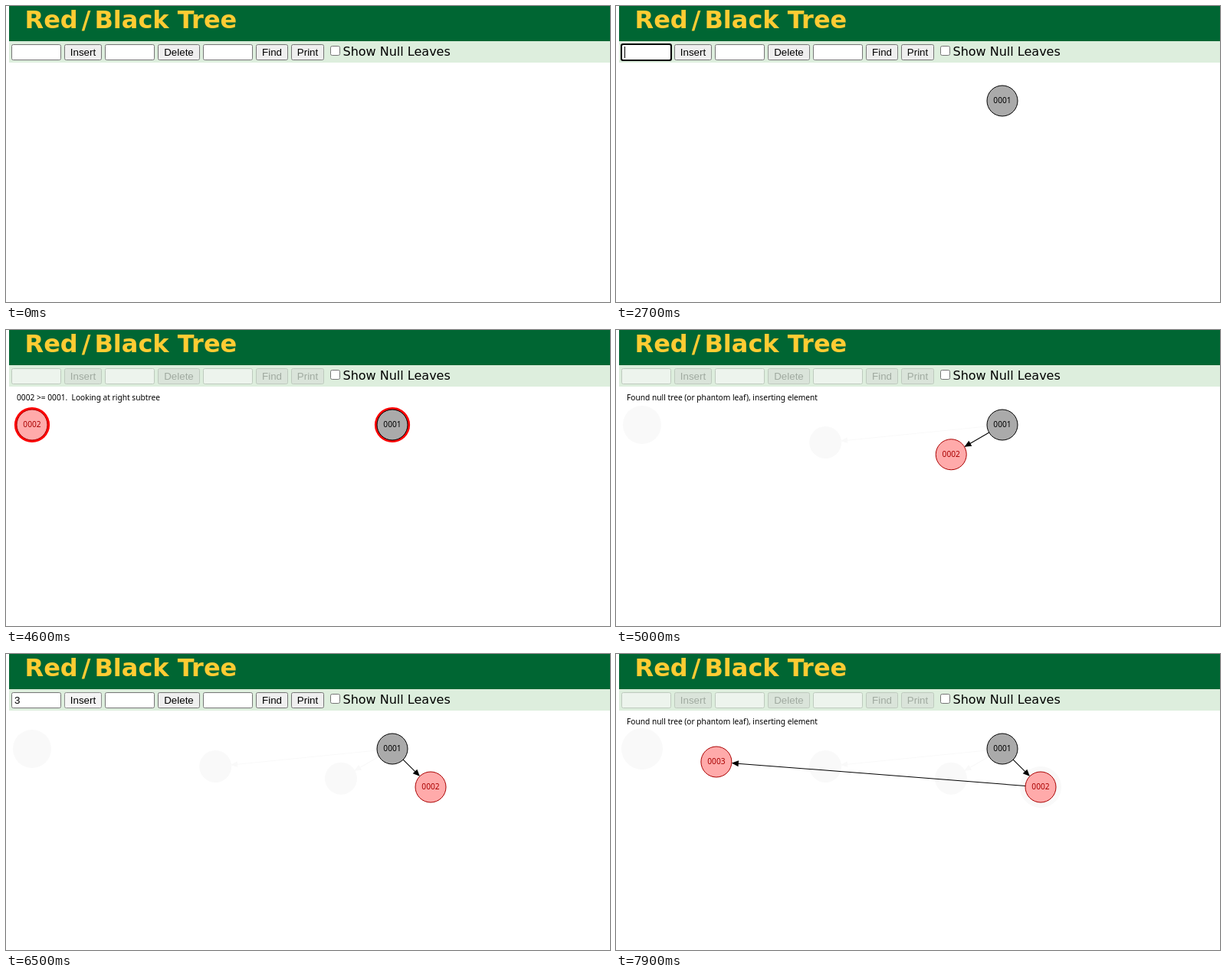
An HTML page for the animation above (8000 ms loop, 788 px wide and 387 px high).

```html
<!DOCTYPE html>
<html lang="en">
<head>
<meta charset="utf-8">
<title>Red/Black Tree</title>
<style>
  html, body { margin: 0; width: 100%; height: 100%; overflow: hidden; background: #fff; }
  svg { display: block; }
  text { white-space: pre; }
  .title { font: bold 32px "DejaVu Sans", sans-serif; fill: #fc3; }
  .label { font: 16px "DejaVu Sans", sans-serif; }
  .ui { font: 13.333px "Liberation Sans", sans-serif; }
  .small { font: 10.2px "Noto Sans", sans-serif; }
</style>
</head>
<body>
<svg width="788" height="387" viewBox="0 0 788 387">
  <path d="M4 0H788V46H4z" fill="#063"/>
  <path d="M4 46H788V74H4z" fill="#ded"/>
  <text class="title" x="24.5" y="29">Red<tspan dx="5">/</tspan><tspan dx="5">Black Tree</tspan></text>
  <rect x="423.5" y="52.5" width="12" height="12" rx="2" fill="#fff" stroke="#767676"/>
  <text class="label" x="439.5" y="65">Show Null Leaves</text>
  <g id="scene"></g>
</svg>
<script>
const LOOP = 8000, STEP = 100;
const scene = document.getElementById('scene');
const ROOT = { x: 504, y: 124 }, RIGHT = { x: 554, y: 174 };
const START = { x: 34, y: 124 }, LAST = { x: 604, y: 224 };
const BLACK = ['#aaa', '#000'], RED = ['#faa', '#a00'];

const within = (t, ...spans) => spans.some(([a, b]) => t >= a && t < b);
const latest = (t, list) => list.reduce((now, [at, value]) => t >= at ? value : now, '');
const mix = (a, b, p) => {
  p = Math.min(1, Math.max(0, p));
  return { x: a.x + (b.x - a.x) * p, y: a.y + (b.y - a.y) * p };
};

const box = (x, w, fill, stroke) =>
  `<rect x="${x + .5}" y="50.5" width="${w - 1}" height="20" rx="2" fill="${fill}" stroke="${stroke}"/>`;
const disc = (c, r, fill, stroke = 'none', width = 1) =>
  `<circle cx="${c.x}" cy="${c.y}" r="${r}" fill="${fill}" stroke="${stroke}" stroke-width="${width}"/>`;
const write = (x, y, text, kind, fill = '#000', anchor = 'start') =>
  `<text class="${kind}" x="${x}" y="${y}" fill="${fill}" text-anchor="${anchor}">${text}</text>`;

function node(c, label, [fill, ink], halo = 0) {
  return (halo ? disc(c, halo, '#f00') : '') + disc(c, 20, fill, ink)
    + write(c.x, c.y + 3, label, 'small', ink, 'middle');
}

// Line between two node centres with an arrow head on the rim of the second
function edge(a, b, color = '#000') {
  const len = Math.hypot(b.x - a.x, b.y - a.y);
  const angle = Math.atan2(b.y - a.y, b.x - a.x) * 180 / Math.PI;
  return `<g transform="translate(${a.x} ${a.y}) rotate(${angle})" fill="${color}" stroke="${color}">
    <path d="M0 0H${len - 21}"/><path d="M${len - 20} 0l-9 4v-8z" stroke="none"/></g>`;
}

function controls(t) {
  const busy = within(t, [1500, 1800], [4200, 5500], [6600, LOOP]);
  const focus = within(t, [900, 1400], [2700, 4100], [5800, 6500]);
  const hover = within(t, [300, 400], [600, 900], [1900, 2700], [5600, 5800]);
  const over = within(t, [1200, 1400], [3600, 4100], [6200, 6500]);
  const down = within(t, [1400, 1500], [4100, 4200], [6500, 6600]);
  const digit = latest(t, [[1000, '1'], [1500, ''], [3100, '2'], [4200, ''], [6100, '3'], [6600, '']]);
  const rim = busy ? '#becabe' : '#767676';
  const ink = busy ? '#a0aaa0' : '#000';
  let out = '';
  for (const x of [7, 129, 257])
    out += box(x, 65, busy ? '#edf4ed' : '#fff', x === 7 && hover ? '#333' : rim);
  for (const [x, w, name] of [[76, 49, 'Insert'], [198, 55, 'Delete'], [326, 42, 'Find'], [372, 43, 'Print']]) {
    let fill = busy ? '#dae4da' : '#efefef', line = rim;
    if (name === 'Insert' && over) [fill, line] = ['#e5e5e5', '#4f4f4f'];
    if (name === 'Insert' && down) [fill, line] = ['#f5f5f5', '#8d8d8d'];
    out += box(x, w, fill, line) + write(x + w / 2, 65, name, 'ui', ink, 'middle');
  }
  if (focus) out += '<rect x="7" y="50" width="65" height="21" rx="2" fill="none" stroke="#000" stroke-width="2"/>';
  if (focus && !within(t, [3500, 4100]))
    out += `<path d="M${digit ? 18.5 : 11.5} 53V68" stroke="#000"/>`;
  return out + write(11, 65, digit, 'ui');
}

const message = t => latest(t, [
  [1500, 'Inserting 0001'], [1800, ''],
  [4200, 'Inserting 0002'],
  [4500, '0002 &gt;= 0001.  Looking at right subtree'],
  [4900, 'Found null tree (or phantom leaf), inserting element'], [5500, ''],
  [6600, 'Inserting 0003'],
  [6900, '0003 &gt;= 0001.  Looking at right subtree'],
  [7500, '0003 &gt;= 0002.  Looking at right subtree'],
  [7900, 'Found null tree (or phantom leaf), inserting element']
]);

// Faint marks left along the path of the second node
function trail(t) {
  const faint = '#f9f9f9';
  let out = '';
  if (within(t, [4900, 6600])) out += disc(START, 25, faint);
  if (t >= 7900) out += disc(START, 27, faint) + disc(RIGHT, 27, faint);
  for (const [at, p] of [[5000, .46], [5100, .775]]) {
    const c = mix(START, RIGHT, p);
    if (t >= at) out += disc(c, 21, faint) + edge(ROOT, c, faint);
  }
  return out;
}

function tree(t) {
  if (t < 1500) return '';
  const wide = t < 6900 ? 25 : 27;
  const pulse = wide - (wide - 23) * Math.abs(Math.sin(Math.PI * (t - 4800) / 330));
  const first = within(t, [4500, 4900]), second = within(t, [6900, 7200]), third = within(t, [7500, 7900]);
  const b = mix(START, RIGHT, .46 + (t - 4900) / 317 - (t < 4900 ? 1 : 0));
  const c = mix(START, LAST, t < 7900 ? 0 : .17 + (t - 7900) / 317);
  let out = trail(t);
  if (t >= 4900) out += edge(ROOT, b);
  if (t >= 7900) out += edge(RIGHT, c);
  out += node(ROOT, '0001', BLACK, (first || second) && pulse);
  if (t >= 4200) out += node(b, '0002', RED, (first || third) && (third || first) && pulse);
  if (t >= 6600) out += node(c, '0003', RED, (second || third) && pulse);
  if (within(t, [7200, 7500]))
    out += disc(mix(ROOT, RIGHT, .08 + (t - 7200) / 317), 20, 'none', '#070', 4);
  return out;
}

let shown = -1;
function draw(now) {
  const t = Math.floor(now % LOOP / STEP) * STEP;
  if (t !== shown) {
    shown = t;
    scene.innerHTML = controls(t) + tree(t) + write(14, 92, message(t), 'small');
  }
  requestAnimationFrame(draw);
}
draw(performance.now());
</script>
</body>
</html>
```
